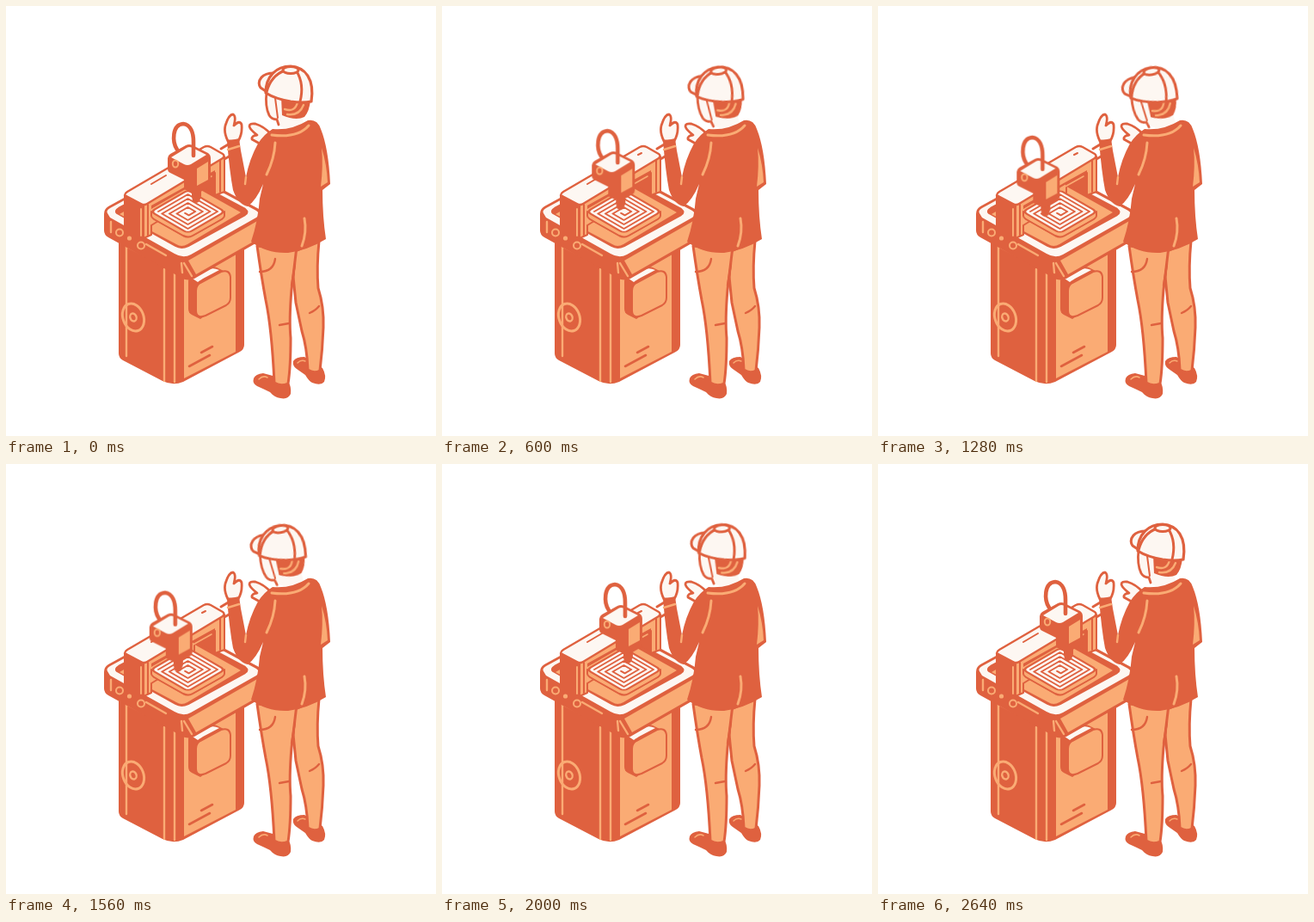
Animation, 500 px wide and 500 px high, one loop 2680 ms. Source, as an HTML page:

```html
<!DOCTYPE html>
<html lang="en">
<head>
<meta charset="utf-8">
<title>Milling machine</title>
<style>
  html, body { margin: 0; width: 100%; height: 100%; overflow: hidden; background: #fff; }
  svg { display: block; width: 100vw; height: 100vh; stroke-linecap: round; stroke-linejoin: round; }
  .d { fill: #df613f; }
  .l { fill: #faab74; }
  .w { fill: #fdf7f2; }
  .n { fill: none; }
  .s { stroke: #df613f; stroke-width: 3; }
  .t { stroke: #df613f; stroke-width: 2; }
  .h { fill: none; stroke: #faab74; stroke-width: 2.4; }
  .carriage { animation: slide 2680ms infinite ease-in-out; }
  .head { transform-origin: 328px 135px; animation: turn 2680ms infinite ease-in-out; }
  @keyframes slide {
    0%, 87.7%, 100% { transform: none; }
    44.4% { transform: translate(-27px, 16px); }
  }
  @keyframes turn {
    0%, 95.5%, 100% { transform: none; }
    35.4%, 49.6% { transform: translate(-2.5px, 1px) rotate(-10deg); }
  }
</style>
</head>
<body>
<svg viewBox="0 0 500 500">
  <g id="cabinet">
    <path class="d" d="M131 270V404Q131 409 136 412L182 436Q194 442 206 437L272 402Q277 399 277 394V275L205 300Z"/>
    <path class="l" d="M207 312L267 282V402L207 433Z"/>
    <path class="h" d="M140 279V407M141 280L163 291M184 306V436M196 309V437"/>
    <g transform="rotate(-20 148 362)">
      <ellipse class="h" cx="148" cy="362" rx="12" ry="16.500" style="stroke-width:3"/>
      <ellipse class="h" cx="148" cy="362" rx="3.600" ry="4.600"/>
    </g>
    <path class="d" d="M212 320Q212 316 216 314L236 304Q240 302 245 304L259 311V340L226 364L216 359Q212 357 212 352Z"/>
    <path class="w" d="M217 317L237 306Q241 304 248 307L229 317Q224 320 223 321Z"/>
    <path class="l t" d="M221 331Q221 325 226 322L250 309Q260 306 261 315V339Q261 345 256 348L232 360Q221 364 221 354Z"/>
    <path class="n s" style="stroke-width:2.600" d="M213 419L237 406M227 403L240 396"/>
  </g>

  <g id="tray">
    <path class="d" d="M114 242Q114 236 119 233L190 194Q204 188 216 194L294 236Q299 239 299 244V264Q299 271 292 275L219 317Q211 321 202 315L119 269Q114 266 114 261Z"/>
    <path class="w" d="M118 241Q116 238 121 235L191 197Q204 191 215 197L291 238Q297 242 291 246L215 289Q206 294 196 288L121 246Z"/>
    <path class="l" d="M212 296L294 249Q296 249 296 252V264Q296 269 291 272L221 312Z"/>
    <path class="d t" d="M129 241Q126 238 131 235L193 202Q204 197 214 202L278 236Q283 240 278 243L212 279Q204 283 197 279Z"/>
    <path class="l" d="M132 242L193 207Q204 202 214 207L273 240L211 277Q204 281 198 277Z"/>
    <path class="h" d="M122 251V263M163 277L186 290M204 299L205 310M207 299L216 314"/>
    <circle class="h" cx="132" cy="263.500" r="4" style="stroke-width:2"/>
    <circle class="l" cx="143.500" cy="270" r="2.600"/>
    <circle class="h" cx="157" cy="278.500" r="4" style="stroke-width:2"/>
  </g>

  <g id="gantry">
    <path class="n s" d="M250 166L260 160M254 178L261 174"/>
    <path class="l t" d="M160 232L254 175V216L243 220V194L219 207V224L169 255V266L160 270Z"/>
    <path class="d" d="M169 232L243 191V218L234 213L219 207L169 236Z"/>
    <path class="h" style="stroke-width:1.600" d="M171 236L239 198"/>
    <path class="d" d="M137 220L161 232V271L137 259Z"/>
    <path class="h" style="stroke-width:2" d="M157 236V267"/>
    <path class="n t" d="M249 179V216M165 231V267"/>
    <path class="w s" style="stroke-width:2.400" d="M138 220Q138 218 141 216L230 164Q234 162 238 164L252 172Q255 174 252 177L164 230Q161 232 157 230Z"/>
    <path class="n t" d="M169 207L186 197M228 173L232 171"/>
  </g>

  <g id="plate">
    <g transform="matrix(1.075 .625 -1.075 .625 211.500 245)">
      <rect class="l t" x="-20" y="-20" width="40" height="40" rx="4"/>
    </g>
    <path class="l" d="M169 239H254V245L217 268Q212 271 206 268L169 245Z"/>
    <path class="n t" d="M169 239V244Q169 246 172 248L206 267Q212 270 217 267L251 248Q254 246 254 244V239"/>
    <g transform="matrix(1.075 .625 -1.075 .625 211.500 239)">
      <rect class="w t" x="-20" y="-20" width="40" height="40" rx="4"/>
      <path class="n s" style="stroke-width:1.700" d="M-16 16V-16H16V16H-12V-12H12V12H-8V-8H8V8H-4V-4H4V3H0"/>
    </g>
  </g>

  <g class="carriage">
    <path class="d" d="M216 212L227 210V221L225 227Q221 231 217 227L216 221Z"/>
    <path class="d" d="M188 177Q188 174 191 172L209 162Q213 160 217 162L235 171Q238 173 238 177V206Q238 209 235 211L223 218Q220 219 217 218L207 213V202L191 194Q188 193 188 189Z"/>
    <path class="w" d="M192 176L210 165Q213 163 217 165L233 173L215 184Q211 186 207 184Z"/>
    <path class="l" d="M222 189L235 181V202L222 209Z"/>
    <ellipse class="h" cx="197" cy="183.500" rx="3.200" ry="4" style="stroke-width:2"/>
    <path class="n s" style="stroke-width:4.600" d="M199 167C193 158 193 138 206 137C215 138 218 148 218 158V174"/>
  </g>

  <g id="legs">
    <path class="d" d="M288 433Q290 428 299 427L314 431L328 437Q332 442 331 451Q328 458 319 456Q312 455 307 449Q301 446 292 442Q286 439 288 433Z"/>
    <path class="d" d="M334 413Q337 408 347 408L368 421Q373 430 370 437Q366 442 356 438Q352 436 348 429L338 422Q333 419 334 413Z"/>
    <path class="h" style="stroke-width:1.500" d="M294 434Q299 429 304 432M339 415Q343 411 348 413"/>
    <path class="l s" d="M336 285L364 273Q361 304 363 328Q370 350 369 374Q368 400 365 424Q358 428 351 423Q350 397 344 378L337 345L334 315Z"/>
    <path class="l s" d="M292 279Q297 315 302 342Q309 375 312 438Q319 443 328 439Q331 420 331 386Q329 365 332 330L338 280Z"/>
    <path class="n s" style="stroke-width:2.400" d="M336 300L332 325M295 309Q311 309 313 294M318 371L329 369M353 357Q360 354 364 349"/>
  </g>

  <g id="hands" class="w s" style="stroke-width:2.800">
    <path d="M258 157Q253 147 255 139Q259 126 264 126Q268 128 265 139Q272 132 274 138Q275 149 270 157Z"/>
    <path d="M308 149Q300 140 290 137Q283 136 283 140Q284 144 292 150Q285 151 286 155L295 160L304 160Z"/>
  </g>

  <path class="w" d="M311 122L316 139Q330 147 346 136L342 122Z"/>
  <g id="jacket">
    <path class="d" d="M257 157L271 154L273 168L279 199Q283 178 293 160Q300 149 310 143Q332 145 351 133Q362 131 366 143Q375 165 377 207L368 214Q368 245 372 271Q351 284 328 287Q303 288 285 274Q293 250 295 224L299 207Q291 226 281 233Q270 231 264 214Q260 193 257 157Z"/>
    <path class="l" d="M367 165Q373 184 374 205L366 210Q369 186 367 165Z"/>
    <path class="h" style="stroke-width:3" d="M309 150Q339 154 352 139M313 159Q312 178 303 196M347 247Q350 263 344 279"/>
    <path class="h" d="M258 167L271 163M279 199L278 207"/>
  </g>

  <g class="head">
    <path class="w" d="M303 100Q301 117 306 128Q309 133 315 132L324 136L338 134L340 104Z"/>
    <path class="n s" style="stroke-width:2.800" d="M303 100Q301 117 306 127Q309 132 315 132L317 138"/>
    <path class="d" d="M320 106L354 109Q353 122 347 129Q337 134 321 127Z"/>
    <path class="h" d="M324 120Q336 124 339 112M327 126Q341 128 346 115"/>
    <path class="n t" d="M313 107L316 130"/>
    <path class="w s" d="M312 78Q301 78 297 83Q292 89 296 95L305 101Z"/>
    <path class="w s" style="stroke-width:3.200" d="M302 101C302 82 314 70 331 70C348 71 359 85 355 111Q345 113 331 111Q313 108 302 101Z"/>
    <path class="n s" d="M324 75Q308 81 303 100M338 76Q347 91 342 111"/>
    <ellipse class="w s" cx="331" cy="74.500" rx="9" ry="4"/>
  </g>
</svg>
</body>
</html>
```
